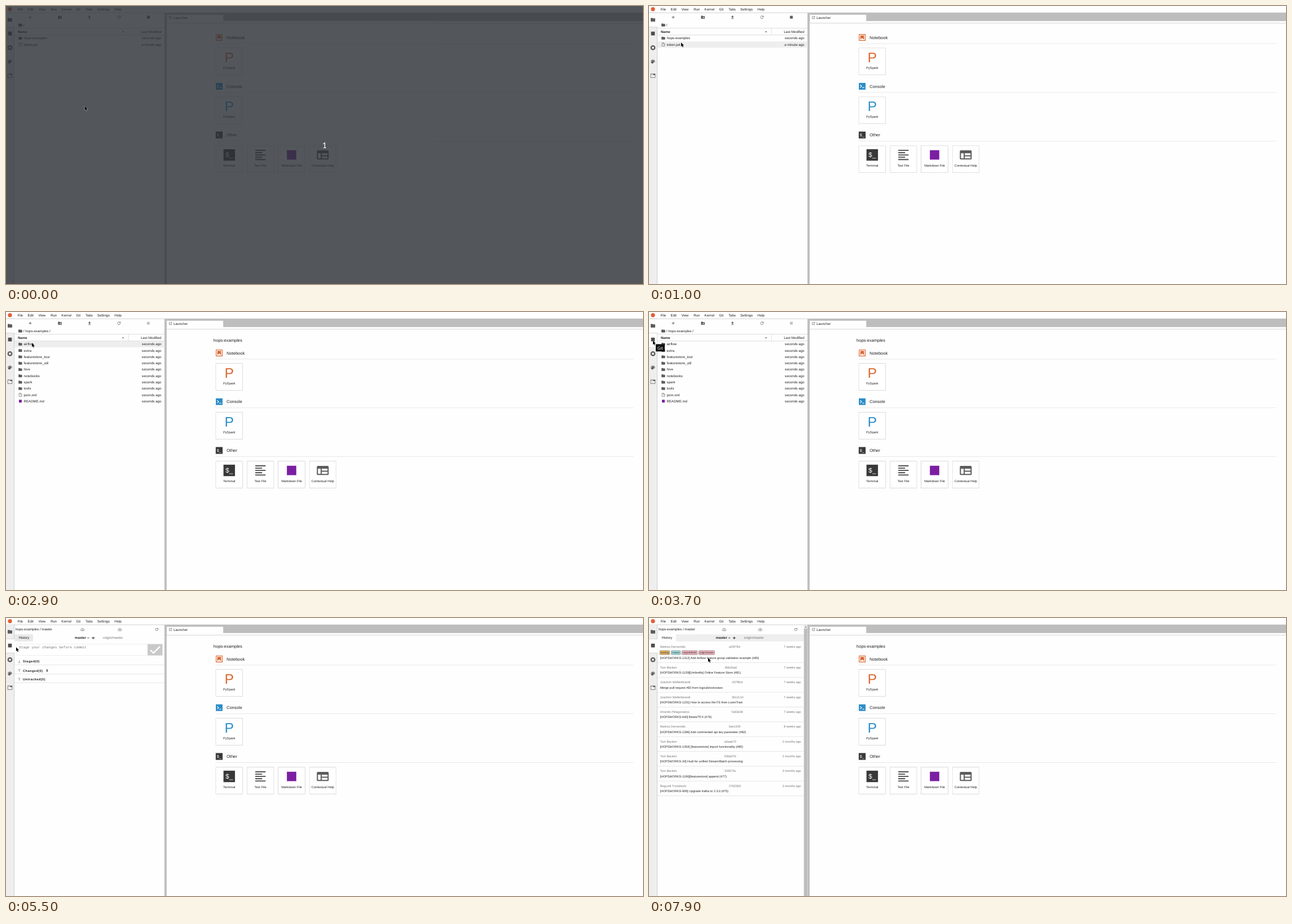
These frames come from a looping animation (1132 by 495 pixels, 8000 ms). An HTML page:

```html
<!DOCTYPE html>
<html lang="en">
<head>
<meta charset="utf-8">
<title>Notebook workspace</title>
<style>
html, body { margin: 0; width: 100%; height: 100%; overflow: hidden; background: #fefefe; }
svg { display: block; width: 1132px; height: 495px; }
text { font: 6.117px "Liberation Sans", Arial, sans-serif; fill: #212121; text-rendering: geometricPrecision; white-space: pre; }
use { color: #5c5c5c; fill: currentColor; }
.end { text-anchor: end; }
.mid { text-anchor: middle; }
.bold { font-weight: bold; }
.title { font-size: 7.53px; }
.label { font-size: 5.65px; }
.big { font-size: 24.5px; }
.status { font-size: 5.65px; font-weight: bold; letter-spacing: .46px; }
.commit { font-size: 5.45px; }
.tag { font-size: 4.33px; }
.mono { font: 6.28px "Liberation Mono", monospace; }
.soft, .mono { fill: #757575; }
.tip text { font: 7.5px "Open Sans", sans-serif; fill: #fff; }
.count { font: 14px Lato, sans-serif; fill: #fff; }
.card { filter: drop-shadow(0 .8px .7px rgba(0, 0, 0, .38)); }
.pick text { fill: #fff; }
.pick use { color: #fff; }

.anim { animation: 8s step-end infinite; }
.dim { animation-name: dim; }
.root { animation-name: root; }
.repo { animation-name: repo; }
.files { animation-name: files; }
.pick { animation-name: pick; }
.hover { animation-name: hover; }
.tip1 { animation-name: tip1; }
.tip2 { animation-name: tip2; }
.tabhover { animation-name: tabhover; }
.active { animation-name: active; }
.cwd { animation-name: cwd; }
.launcher { animation-name: launcher; }
.git { animation-name: git; }
.history { animation-name: history; }
.cursor { animation-name: cursor; }

@keyframes dim { 0% { visibility: visible } 1.25%, 100% { visibility: hidden } }
@keyframes root { 0% { visibility: visible } 27.5%, 100% { visibility: hidden } }
@keyframes repo { 0% { visibility: hidden } 27.5% { visibility: visible } 57.5%, 100% { visibility: hidden } }
@keyframes files { 0% { visibility: visible } 57.5%, 100% { visibility: hidden } }
@keyframes pick { 0% { visibility: hidden } 25% { visibility: visible } 27.5%, 100% { visibility: hidden } }
@keyframes hover {
  0% { visibility: hidden; transform: translateY(11.29px) }
  12.5% { visibility: visible; transform: translateY(11.29px) }
  13.75% { visibility: visible; transform: none }
  38.75%, 100% { visibility: hidden; transform: none }
}
@keyframes tip1 { 0% { visibility: hidden } 18.75% { visibility: visible } 25%, 100% { visibility: hidden } }
@keyframes tip2 { 0% { visibility: hidden } 46.25% { visibility: visible } 57.5%, 100% { visibility: hidden } }
@keyframes tabhover { 0% { visibility: hidden } 40% { visibility: visible } 57.5%, 100% { visibility: hidden } }
@keyframes active { 0% { transform: none } 57.5%, 100% { transform: translateY(25px) } }
@keyframes cwd { 0% { visibility: hidden } 28.75%, 100% { visibility: visible } }
@keyframes launcher { 0% { transform: none } 28.75%, 100% { transform: translateY(16.85px) } }
@keyframes git { 0% { visibility: hidden } 57.5% { visibility: visible } 86.25%, 100% { visibility: hidden } }
@keyframes history { 0% { visibility: hidden } 86.25%, 100% { visibility: visible } }
@keyframes cursor {
  0% { transform: translate(140px, 178.3px) }
  10% { transform: translate(122px, 150px) }
  11.25% { transform: translate(85px, 100px) }
  12.5% { transform: translate(57px, 65px) }
  13.75% { transform: translate(50px, 57px) }
  36.25% { transform: translate(46px, 55px) }
  37.5% { transform: translate(33px, 52px) }
  38.75% { transform: translate(20px, 50.5px) }
  40% { transform: translate(13px, 50.5px) }
  42.5% { transform: translate(7px, 50.8px) }
  68.75% { transform: translate(18px, 52px) }
  70% { transform: translate(48px, 51px) }
  71.25% { transform: translate(88px, 47px) }
  72.5% { transform: translate(124px, 42px) }
  73.75% { transform: translate(144px, 39px) }
  75% { transform: translate(149px, 37px) }
  76.25% { transform: translate(140px, 36.5px) }
  77.5% { transform: translate(116px, 36.5px) }
  78.75% { transform: translate(89px, 37px) }
  80% { transform: translate(69px, 37px) }
  81.25% { transform: translate(53px, 37.5px) }
  82.5% { transform: translate(46px, 38px) }
  92.5% { transform: translate(46px, 45px) }
  93.75% { transform: translate(44px, 58px) }
  95% { transform: translate(42px, 67px) }
  97.5% { transform: translate(70px, 69px) }
  98.75%, 100% { transform: translate(105px, 71px) }
}
</style>
</head>
<body>
<svg viewBox="0 0 1132 495">
  <defs>
    <symbol id="folder" viewBox="0 0 24 24"><path d="M10 4H4a2 2 0 0 0-2 2v12a2 2 0 0 0 2 2h16a2 2 0 0 0 2-2V8a2 2 0 0 0-2-2h-8z"/></symbol>
    <symbol id="newfolder" viewBox="0 0 24 24"><path d="M20 6h-8l-2-2H4a2 2 0 0 0-2 2v12a2 2 0 0 0 2 2h16a2 2 0 0 0 2-2V8a2 2 0 0 0-2-2zm-1 8h-3v3h-2v-3h-3v-2h3V9h2v3h3z"/></symbol>
    <symbol id="file" viewBox="0 0 24 24"><path d="M5 3h9l6 6v12H5zM13 3v7h7" fill="none" stroke="currentColor" stroke-width="2"/></symbol>
    <symbol id="square" viewBox="0 0 24 24"><path d="M2 2h20v20H2z"/></symbol>
    <symbol id="stop" viewBox="0 0 24 24"><path fill-rule="evenodd" d="M12 1a11 11 0 1 0 .01 0zM7.5 7.5h9v9h-9z"/></symbol>
    <symbol id="palette" viewBox="0 0 24 24"><path fill-rule="evenodd" d="M12 3a9 9 0 0 0 0 18 1.5 1.5 0 0 0 1.1-2.5 1.5 1.5 0 0 1 1.1-2.5H16a5 5 0 0 0 5-5c0-4.4-4-8-9-8zM6.5 9a1.5 1.5 0 1 0 .01 0zM9.5 5a1.5 1.5 0 1 0 .01 0zM14.500 5a1.500 1.500 0 1 0 .01 0zM17.500 9a1.500 1.500 0 1 0 .01 0z"/></symbol>
    <symbol id="tab" viewBox="0 0 24 24"><path d="M21 3H3a2 2 0 0 0-2 2v14a2 2 0 0 0 2 2h18a2 2 0 0 0 2-2V5a2 2 0 0 0-2-2zm0 16H3V5h10v4h8z"/></symbol>
    <symbol id="add" viewBox="0 0 24 24"><path d="M19 13.200h-5.800V19h-2.400v-5.800H5v-2.400h5.800V5h2.400v5.800H19z"/></symbol>
    <symbol id="upload" viewBox="0 0 24 24"><path d="M5 20h14v-2H5zm0-10h4v6h6v-6h4l-7-7z"/></symbol>
    <symbol id="refresh" viewBox="0 0 24 24"><path d="M17.650 6.350A8 8 0 1 0 19.730 14h-2.080A6 6 0 1 1 16.220 7.780L13 11h7V4z"/></symbol>
    <symbol id="down" viewBox="0 0 24 24"><path d="M6 19a5 5 0 0 1 0-10 6.500 6.500 0 0 1 12.500 2 4 4 0 0 1 .5 8zM12 9v7M9 13l3 3 3-3" fill="none" stroke="currentColor" stroke-width="2"/></symbol>
    <symbol id="up" viewBox="0 0 24 24"><path d="M6 19a5 5 0 0 1 0-10 6.500 6.500 0 0 1 12.500 2 4 4 0 0 1 .5 8zM12 17v-7M9 13l3-3 3 3" fill="none" stroke="currentColor" stroke-width="2"/></symbol>
    <symbol id="launch" viewBox="0 0 24 24"><path d="M12 4H4v16h16v-8M14 4h6v6M20 4L8.500 15.500" fill="none" stroke="currentColor" stroke-width="2.200"/></symbol>
    <symbol id="chevron" viewBox="0 0 24 24"><path d="M5 8l7 7 7-7" fill="none" stroke="#212121" stroke-width="4"/></symbol>
    <symbol id="stage" viewBox="0 0 24 24"><path d="M12 3v13M8 12l4 4 4-4M4 20.500h16" fill="none" stroke="currentColor" stroke-width="1.800"/></symbol>
    <symbol id="unstage" viewBox="0 0 24 24"><path d="M12 21V8M8 12l4-4 4 4M4 3.500h16" fill="none" stroke="currentColor" stroke-width="1.800"/></symbol>
    <symbol id="trash" viewBox="0 0 24 24"><path d="M6 8h12v14H6zM5 4h4l1-2h4l1 2h4v2H5z"/></symbol>
    <symbol id="bookmark" viewBox="0 0 24 24"><path d="M1.300 1.300h21.400v21.400H1.300z" fill="none" stroke="currentColor" stroke-width="2.600"/><path d="M5.500 5h13v14.500L12 14l-6.500 5.500z"/></symbol>
    <symbol id="console" viewBox="0 0 24 24"><path d="M0 0h24v24H0z"/><path d="M5 7l5 5-5 5M12.500 17h7" fill="none" stroke="#fff" stroke-width="2.200"/></symbol>
    <symbol id="lines" viewBox="0 0 24 24"><path d="M3 3h18v2H3zM3 7h12v2H3zM3 11h18v2H3zM3 15h12v2H3zM3 19h18v2H3z"/></symbol>
    <symbol id="panes" viewBox="0 0 24 24"><path fill-rule="evenodd" d="M3.500 4h17a1.800 1.800 0 0 1 1.800 1.800v12.400a1.800 1.800 0 0 1-1.800 1.800h-17a1.800 1.800 0 0 1-1.800-1.800V5.800A1.800 1.800 0 0 1 3.500 4zM3.700 9h4.600v9H3.700zM10.300 9h10v3.500h-10zM10.300 14.500h10V18h-10z"/></symbol>
  </defs>
</svg>
<script>
const text = (x, y, s, cls = "") => `<text x="${x}" y="${y}" class="${cls}">${s}</text>`;
const rect = (x, y, w, h, fill, more = "") =>
  `<rect x="${x}" y="${y}" width="${w}" height="${h}" fill="${fill}" ${more}/>`;
const icon = (id, x, y, size, color) =>
  `<use href="#${id}" x="${x - size / 2}" y="${y - size / 2}" width="${size}" height="${size}"${color ? ` style="color:${color}"` : ""}/>`;
const rule = (x, y, w, color = "#dcdcdc") => rect(x, y - .3, w, .7, color);
const group = (cls, ...parts) => `<g class="anim ${cls}">${parts.join("")}</g>`;

const GRAY = "#bdbdbd", ORANGE = "#da672f", BLUE = "#2b8cc7", DARK = "#383838", PURPLE = "#7b1fa2";
const ROW = 11.29;

const fileRow = ([name, kind = "folder", when = "seconds ago"], i) => {
  const y = 57.2 + i * ROW;
  const mark = kind === "square" ? icon(kind, 25.5, y, 6, PURPLE) : icon(kind, 25.4, y, 7.7);
  return mark + text(31.6, y + 2.1, name) + text(276, y + 2.1, when, "end");
};

const rootFiles = [["hops-examples"], ["token.jwt", "file", "a minute ago"]];
const repoFiles = [
  ...["airflow", "extra", "featurestore_tour", "featurestore_util", "hive", "notebooks", "spark", "tools"].map(n => [n]),
  ["pom.xml", "file"], ["README.md", "square"]
];

const frame = () => {
  const menu = { File: 20.4, Edit: 38.5, View: 57.4, Run: 79.2, Kernel: 98.6, Git: 124.5, Tabs: 141.2, Settings: 162.2, Help: 192.8 };
  return rect(0, 0, 1132, 495, "#fefefe") +
    `<circle cx="7" cy="5.700" r="3.600" fill="#e0603a"/>` +
    Object.entries(menu).map(([s, x]) => text(x, 7.8, s)).join("") +
    rule(0, 12, 1132, GRAY) +
    rect(0, 12.3, 14.6, 483, "#eee") + rect(14.3, 12, .7, 483, GRAY) +
    group("tabhover", rect(0, 37.4, 14.3, 24.6, "#fefefe")) +
    group("active", rect(0, 12.4, 15.2, 24.6, "#fefefe"), rule(0, 37.2, 14.6, "#c8c8c8"), rule(0, 12, 14.6, "#c8c8c8")) +
    icon("folder", 7, 24.5, 9.6) + icon("square", 7, 49, 8, "#4c4c4c") + icon("stop", 7, 74.2, 9.6) +
    icon("palette", 7, 99, 9.6) + icon("tab", 7, 124.2, 9.6) +
    rect(281.6, 12, 3.900, 483, GRAY) + rect(285.5, 12, 847, 14.8, GRAY) +
    rect(286, 15.6, 100, 11.4, "#fefefe") + rule(285.5, 30.3, 847, "#c4c4c4") +
    icon("launch", 292.3, 20.500, 6.500) + text(297.5, 22.7, "Launcher");
};

const section = (y, mark, color, name) =>
  (mark === "term" ? terminal(378.8, y, 12.2) : icon(mark, 378.8, y, 12.2, color)) +
  text(392, y + 2.7, name, "title") + rule(372.5, y + 11, 742.5, "#e0e0e0");

const terminal = (x, y, s) => rect(x - s / 2, y - s / 2, s, s, DARK) +
  `<text x="${x}" y="${y + s * .17}" class="mid" style="fill:#fff;font-size:${s * .58}px">$_</text>`;

const card = (i, y, name, art) => {
  const x = 373 + i * 55.4;
  return `<rect class="card" x="${x}" y="${y}" width="47.500" height="47.500" fill="#fff" stroke="#ddd" stroke-width=".4"/>` +
    art(x + 23.7, y + 16.2) + text(x + 23.7, y + 37.3, name, "mid label");
};
const letter = color => (x, y) => `<text x="${x}" y="${y + 9}" class="mid big" style="fill:${color}">P</text>`;

const launcher = () => group("cwd", text(368.8, 52.6, "hops-examples", "title")) +
  group("launcher",
    section(56, "bookmark", ORANGE, "Notebook"), card(0, 75, "PySpark", letter(ORANGE)),
    section(142.8, "console", BLUE, "Console"), card(0, 162, "PySpark", letter(BLUE)),
    section(229.7, "term", DARK, "Other"),
    card(0, 249, "Terminal", (x, y) => terminal(x, y, 20.4)),
    card(1, 249, "Text File", (x, y) => icon("lines", x, y, 24.5)),
    card(2, 249, "Markdown File", (x, y) => icon("square", x, y, 20, PURPLE)),
    card(3, 249, "Contextual Help", (x, y) => icon("panes", x, y, 24.5)));

const fileBrowser = () =>
  group("files",
    icon("add", 43, 20, 8.5), icon("newfolder", 95.800, 20, 8), icon("upload", 148.4, 20, 8), icon("refresh", 200.8, 20, 8),
    icon("folder", 25.4, 33.8, 8),
    rule(15, 39.5, 266.5, "#cfcfcf"), rule(15, 51.700, 266.5, "#cfcfcf"), rect(217.4, 39.6, .6, 12, "#d4d4d4"),
    text(20.9, 47.6, "Name", "bold"), text(276, 47.6, "Last Modified", "end"),
    `<path d="M206 46.400l2-2 2 2z" fill="#616161"/>`) +
  group("hover", rect(15, 52, 266.5, 11, "#eee")) +
  group("root", icon("square", 253, 20, 6), text(30.800, 35.700, "/"), rootFiles.map(fileRow).join("")) +
  group("repo", icon("square", 253, 20, 6, "#c4c4c4"), text(30.800, 35.700, "/ hops-examples /"), repoFiles.map(fileRow).join("")) +
  group("pick", rect(15, 51.8, 266.5, 11.3, "#3b9fe3"), fileRow(rootFiles[0], 0));

// dx holds the toolbar offsets once the scrollbar takes its share of the width
const gitHead = (dx, open) =>
  text(16.8, 22.2, "hops-examples / master") +
  icon("down", 136 - dx * .35, 20.5, 7.6) + icon("up", 202.2 - dx * .65, 20.500, 7.6) + icon("refresh", 268 - dx, 20.5, 7.6) +
  (open ? rect(48, 29, 227.500, 12.7, "#eee") : rect(15, 29, 33, 12.7, "#e9e9e9")) +
  text(22.4, 37.300, "History") + text(122.3 - dx / 2, 37.300, "master", "bold") +
  icon("chevron", 146.3 - dx / 2, 35.5, 5.5) + icon("add", 155 - dx / 2, 35.5, 8.4, "#212121") +
  text(172.3 - dx / 2, 37.300, "origin/master", "soft");

const status = (y, name, mark) => icon(mark, 23.6, y + .3, 6.4) + text(30, y + 2.1, name, "status") + rule(15, y + 6.2, 266.5);

const gitPanel = () => group("git", gitHead(0, false),
  rect(19, 46.700, 232.5, 20, "#fff", 'stroke="#ddd" stroke-width=".5"'),
  text(22.9, 54.2, "Stage your changes before commit", "mono"),
  rect(251.8, 46.4, 26.2, 20.300, "#c9c9c9"),
  `<path d="M256.500 57l5.600 5.400L273.500 50.800" fill="none" stroke="#fff" stroke-width="2.400"/>`,
  status(77.3, "Staged(0)", "stage"), status(93.5, "Changed(0)", "unstage"), status(108.9, "Untracked(0)", "unstage"),
  icon("trash", 73, 93.300, 5.4));

const A = "Markos Dervenidis", B = "Tom Backen", C = "Joachim Wellenbrandt";
const commits = [
  [A, 142, "a20f79d", "7 weeks", "[HOPSWORKS-1312] Add Airflow feature group validation example (#85)"],
  [B, 134.8, "6bb2bad", "7 weeks", "[HOPSWORKS-1139][Umbrella] Online Feature Store (#81)"],
  [C, 147.4, "437f8cb", "7 weeks", "Merge pull request #83 from logicalclocks/aws"],
  [C, 147, "3612c10", "7 weeks", "[HOPSWORKS-1231] How to access the FS from LoomTrain"],
  ["Aristidis Pelagonakos", 145.7, "7a63e38", "7 weeks", "[HOPSWORKS-640] Beam/TFX (#76)"],
  [A, 141.4, "3ae1429", "8 weeks", "[HOPSWORKS-1286] Add commented api key parameter (#82)"],
  [B, 133.7, "a0aab70", "2 months", "[HOPSWORKS-1264] [featurestore] import functionality (#80)"],
  [B, 133.7, "53be07b", "2 months", "[HOPSWORKS-34] Hudi for unified Stream/Batch processing"],
  [B, 134.3, "52837fa", "3 months", "[HOPSWORKS-1196][featurestore] append (#77)"],
  ["Bogumil Trzcielecki", 142, "2762360", "3 months", "[HOPSWORKS-909] Upgrade Kafka to 2.3.0 (#75)"]
];
const commit = ([who, x, hash, age, note], i) => {
  const y = 73 + i * 26.34;
  const top = i ? y - 9.4 : 52.800;
  return text(19.7, top, who, "commit soft") + text(x, top, hash, "commit soft") +
    text(270, top, age + " ago", "commit soft end") + text(19.7, y, note, "commit") + rule(15, y + 6.5, 260.500);
};
const tags = [[19.2, 17.4, "#e6b566", "working"], [39.4, 16.6, "#a5dfdf", "master"],
  [58.5, 27.6, "#efb4bd", "origin/HEAD"], [88.500, 28, "#efb4bd", "origin/master"]];
const tag = ([x, w, color, name]) =>
  rect(x, 58.1, w, 7.2, color, 'rx="1.300" stroke="#555" stroke-width=".5"') + text(x + w / 2, 63.1, name, "tag mid");

const history = () => group("history", gitHead(7, true), commits.map(commit).join(""), tags.map(tag).join(""),
  rect(275.4, 12.4, 6.2, 483, "#e4e4e4"), rect(275.4, 19, 6, 476, GRAY), rect(281.3, 12.4, .4, 483, "#d2d2d2"),
  `<path d="M276.800 16.800l1.700-1.800 1.700 1.800z" fill="#707070"/>`);

const tip = (cls, x, y, w, s) => group("tip " + cls, rect(x, y, w, 13, "#111", 'rx="1"'), text(x + 3, y + 9.2, s));

document.querySelector("svg").insertAdjacentHTML("beforeend",
  frame() + launcher() + fileBrowser() + gitPanel() + history() +
  tip("tip1", 54.600, 64, 56, "hops-examples") + tip("tip2", 12, 57.3, 16, "Git") +
  group("dim", rect(0, 0, 1132, 495, "rgba(46,51,57,.82)"), text(566, 252.8, "1", "mid count")) +
  group("cursor", `<path d="M0 0V7.300L1.700 5.800 2.900 8.500 4.100 8 2.900 5.300H5.200z" fill="#000" stroke="#fff" stroke-width=".7" paint-order="stroke"/>`));
</script>
</body>
</html>
```
